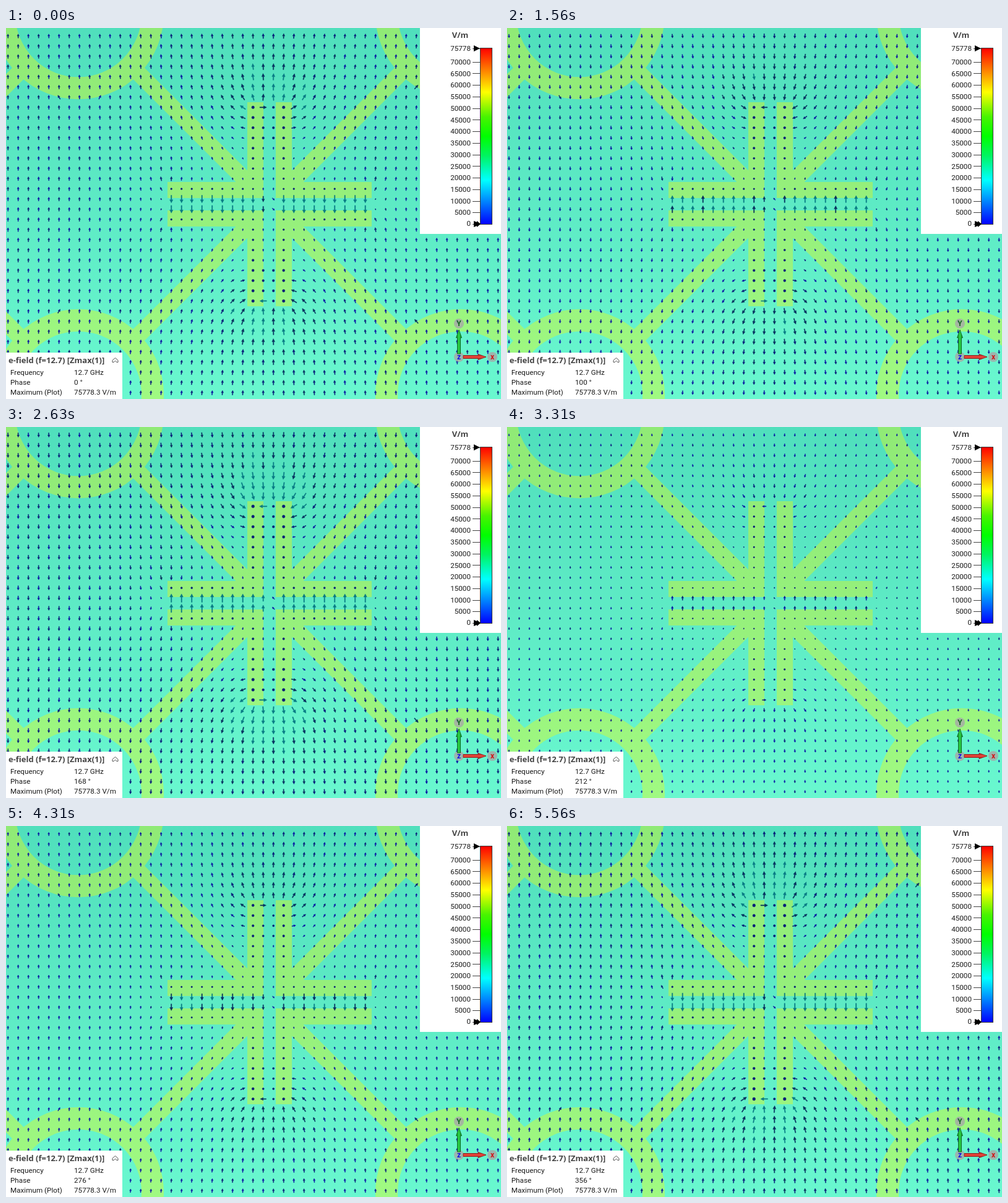
These frames come from a looping animation (800x600 px, 5.62 s). An HTML page:

```html
<!DOCTYPE html>
<html lang="en">
<head>
<meta charset="utf-8">
<title>e-field phase animation</title>
<style>
html, body { margin: 0; width: 100%; height: 100%; overflow: hidden; background: #fff; }
svg { display: block; width: 800px; height: 600px; }
text { font: 11.7px Roboto, "Open Sans", sans-serif; fill: #1c1c1c; }
.head { font: 700 13px "Open Sans", "Noto Sans", sans-serif; fill: #444; }
.axis { font-weight: 700; font-size: 12px; text-anchor: middle; }
</style>
</head>
<body>
<svg viewBox="0 0 800 600">
  <defs>
    <linearGradient id="sea" x1="0" y1="0" x2="0" y2="1">
      <stop offset="0" stop-color="#50dfbc"/><stop offset=".5" stop-color="#5eebc5"/><stop offset="1" stop-color="#69f8cf"/>
    </linearGradient>
    <linearGradient id="metal" gradientUnits="userSpaceOnUse" x1="0" y1="0" x2="0" y2="600">
      <stop offset="0" stop-color="#90ea76"/><stop offset=".5" stop-color="#96f07c"/><stop offset="1" stop-color="#a0fa82"/>
    </linearGradient>
    <linearGradient id="scale" x1="0" y1="0" x2="0" y2="1">
      <stop offset="0" stop-color="#f00"/><stop offset=".25" stop-color="#ff0"/><stop offset=".39" stop-color="#48f400"/>
      <stop offset=".5" stop-color="#0f0"/><stop offset=".61" stop-color="#00f460"/>
      <stop offset=".75" stop-color="#0ff"/><stop offset="1" stop-color="#00f"/>
    </linearGradient>
    <linearGradient id="up"><stop offset="0" stop-color="#0a7a1c"/><stop offset=".5" stop-color="#2fd84a"/><stop offset="1" stop-color="#0a7a1c"/></linearGradient>
    <linearGradient id="side" x1="0" y1="0" x2="0" y2="1"><stop offset="0" stop-color="#a01818"/><stop offset=".5" stop-color="#f04a3c"/><stop offset="1" stop-color="#a01818"/></linearGradient>
    <mask id="shape">
      <g id="quads" fill="#fff" stroke="none"></g>
    </mask>
  </defs>
  <rect width="800" height="600" fill="url(#sea)"/>
  <rect width="800" height="600" fill="url(#metal)" mask="url(#shape)"/>
  <g id="arrows"></g>

  <rect x="669" width="131" height="333" fill="#fff"/>
  <text class="head" x="734" y="16" text-anchor="middle">V/m</text>
  <g id="ticks"></g>
  <rect x="766.5" y="32.5" width="19" height="285" fill="url(#scale)" stroke="#333"/>
  <path d="M756 28l10 5-10 5zM756 312l5 2 0-2 6 5-6 5 0-2-5 2z"/>

  <rect y="525" width="188" height="75" fill="#fff"/>
  <text class="head" x="4" y="542">e-field (f=12.7) [Zmax(1)]</text>
  <path d="M172 537.5l4.5-4 4.5 4v3h-2l-2.5-2.2-2.5 2.2h-2z" fill="none" stroke="#555"/>
  <text x="7" y="561">Frequency</text><text x="110" y="561">12.7 GHz</text>
  <text x="7" y="577">Phase</text><text x="110" y="577" id="phase"></text>
  <text x="7" y="593">Maximum (Plot)</text><text x="110" y="593">75778.3 V/m</text>

  <g fill="#a8a8a8" fill-opacity=".8">
    <circle cx="732" cy="478" r="8"/><circle cx="732" cy="532" r="8"/><circle cx="786" cy="532" r="8"/>
  </g>
  <path d="M729.5 527V501h-2l4.5-13 4.5 13h-2v26z" fill="url(#up)" stroke="#0a5c18" stroke-width=".8"/>
  <path d="M739 529.5h24v-2l13 4.5-13 4.5v-2h-24z" fill="url(#side)" stroke="#8a1414" stroke-width=".8"/>
  <text class="axis" x="732" y="482" style="fill:#126a1c">Y</text>
  <text class="axis" x="732" y="536" style="fill:#1414e0">z</text>
  <text class="axis" x="786" y="536" style="fill:#d01818">x</text>
</svg>
<script>
const LOOP = 5620, CX = 426, CY = 285, PITCH = 16.5, LAG = 36;
const $ = id => document.getElementById(id);

// One quarter of the antenna, mirrored about the centre
const quarter = `
  <path d="M-36-165h26v155h-155v-26h129z M-203-221.5L-36-54.5V-36H-54.5L-221.5-203z M-426-210.5V-173.5L-397-202.5 -415-221.5z"/>
  <circle cx="-309" cy="-307.7" r="120" fill="none" stroke="#fff" stroke-width="36"/>`;
$('quads').innerHTML = [[1, 1], [-1, 1], [1, -1], [-1, -1]]
  .map(([a, b]) => `<g transform="translate(${CX} ${CY}) scale(${a} ${b})">${quarter}</g>`).join('');

const levels = [75778];
for (let v = 70000; v >= 0; v -= 5000) levels.push(v);
$('ticks').innerHTML = levels.map(v => {
  const y = 317 - v / 75778 * 284;
  return `<text x="751" y="${y + (v ? 4.2 : 3.2)}" text-anchor="end">${v}</text>
    <path d="M754 ${Math.round(y) + .5}h13" stroke="#444"/>`;
}).join('');

const inks = ['#06107a', '#0913a2', '#071d78', '#06305f', '#087a84'];
const limits = [3.6, 6.4, 8.2, 10.6];
$('arrows').innerHTML = inks.map(c => `<path fill="${c}" stroke="${c}" stroke-width=".5"/>`).join('');
const layers = [...$('arrows').children];

// x, y, strength of the charges on the strip ends
const charges = [];
for (const s of [1, -1]) for (const m of [1, -1])
  charges.push([CX + m * 23, CY - s * 158, s * 1150], [CX + m * 23, CY - s * 125, s * 480],
               [CX + m * 164, CY - s * 23, s * 330]);

function field(x, y) {
  const dx = Math.abs(x - CX), dy = Math.abs(y - CY), s = y < CY ? 1 : -1;
  if (dy < 11 && dx < 165)
    return dx < 8 ? { x: 4, y: 4 } : { x: 0, y: dx < 12 ? 11 : 14.5 };
  if (dx > 20 && dx < 30 && dy < 165) return { dot: .8 + dy / 110 };
  if (dx < 15 && dy < 165) {
    if (dy > 150 && x < CX) return { x: 13 * s, y: 0 };
    return dy > 100 ? { dot: 1.6 } : { x: 0, y: -4.5 };
  }
  if (dy > 15 && dy < 36 && dx < 165) return { dot: 1.1 };
  let ex = 0, ey = -7.6;
  for (const [qx, qy, q] of charges) {
    const ax = x - qx, ay = y - qy, r = (ax * ax + ay * ay + 150) ** 1.25;
    ex += q * ax / r;
    ey += q * ay / r;
  }
  // Tilted spots where the ring edges pass
  if (Math.abs(Math.abs(x - 118.5) - 33) < 3 && Math.abs(dy - 173) < 3)
    ex += (x < 118 ? -4 : 4) * s;
  if (x > 660 && x < 667 && Math.abs(dy - 190) < 3) ex += 6 * s;
  const k = Math.min(1, 12.5 / Math.hypot(ex, ey));
  return { x: ex * k, y: ey * k };
}

const points = [];
for (let r = 0; r < 36; r++) for (let c = 0; c < 49; c++) {
  const x = 3.2 + c * PITCH, y = 13 + r * 16.48;
  points.push({ px: x, py: y, tint: Math.sin(c * 2.4 + r * .2) * .9, ...field(x, y) });
}

const f = n => n.toFixed(2);

function arrow(x, y, vx, vy, len) {
  const ux = vx / len, uy = vy / len, h = len / 2;
  const head = h - Math.min(len * .5, 5), w = Math.min(.5 + len * .18, 2.6), t = Math.min(.3 + len * .03, .65);
  const at = (a, b) => f(x + ux * a - uy * b) + ' ' + f(y + uy * a + ux * b);
  return 'M' + [at(-h, t), at(head, t), at(head, w), at(h, 0), at(head, -w), at(head, -t), at(-h, -t)].join('L') + 'z';
}

function disc(x, y, r) {
  return `M${f(x - r)} ${f(y)}a${f(r)} ${f(r)} 0 1 0 ${f(2 * r)} 0a${f(r)} ${f(r)} 0 1 0 ${f(-2 * r)} 0z`;
}

function draw(step) {
  const deg = step * 4, paths = inks.map(() => '');
  const wave = Math.cos((deg + LAG) * Math.PI / 180);
  const size = Math.abs(wave) ** .75, gain = Math.sign(wave) * size;
  for (const p of points) {
    if (p.dot) {
      paths[size > .5 ? 2 : 0] += disc(p.px, p.py, .45 + p.dot * size * .95);
      continue;
    }
    const vx = p.x * gain, vy = p.y * gain, len = Math.max(Math.hypot(vx, vy), .01);
    const i = limits.filter(v => len + p.tint > v).length;
    paths[i] += arrow(p.px, p.py, vx, vy, len);
  }
  layers.forEach((l, i) => l.setAttribute('d', paths[i]));
  $('phase').textContent = deg + ' °';
}

const start = performance.now();
let shown = -1;
function tick() {
  const t = (performance.now() - start) % LOOP;
  // 62.5 ms steps, held to 10 ms ticks
  const step = Math.ceil((Math.floor(t / 10) + .5) / 6.25) - 1;
  if (step !== shown) draw(shown = step);
  requestAnimationFrame(tick);
}
tick();
</script>
</body>
</html>
```
